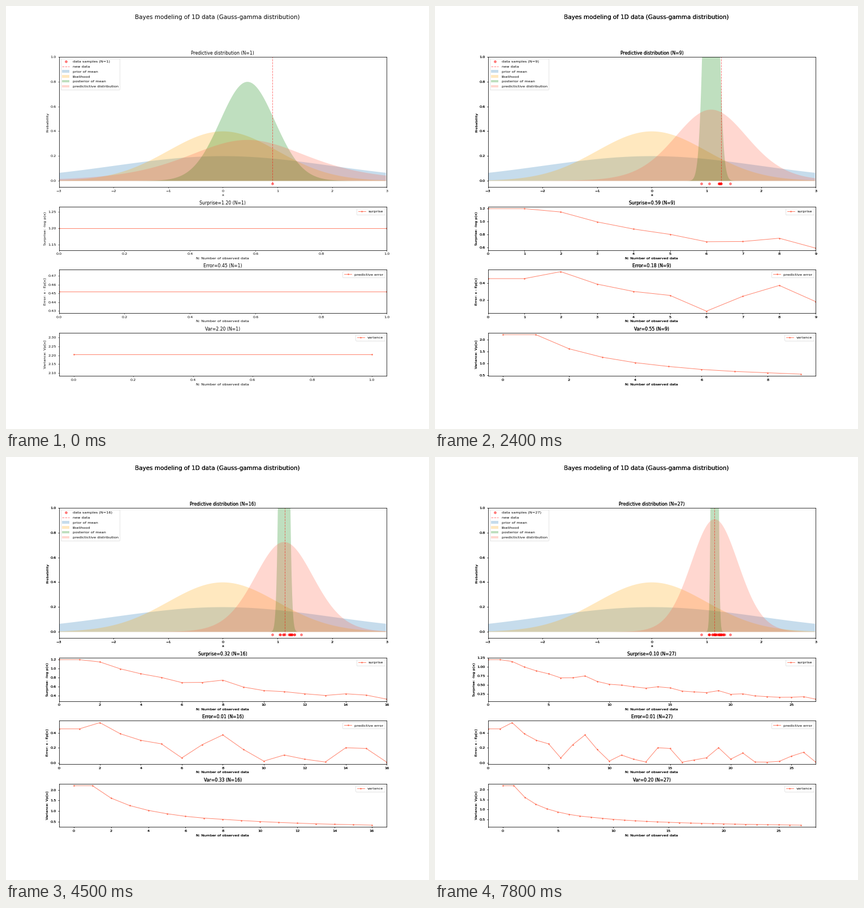
Write a matplotlib script that moves like this. It is 748 by 748 pixels and loops after 8000 ms.

```python
import math

import numpy as np
import matplotlib.pyplot as plt
from matplotlib.animation import FuncAnimation

plt.rcParams["font.family"] = "DejaVu Sans"

SAMPLES = np.array([
    0.9045, 1.2545, 1.2355, 1.2235, 1.2275, 1.052, 1.263, 1.438, 1.266,
    1.113, 1.203, 1.045, 1.107, 1.311, 1.314, 1.133, 1.165, 1.0536,
    1.334, 1.1847, 1.272, 1.1535, 1.1525, 1.164, 1.236, 1.293, 1.1405,
])
A0, B0, BETA0 = 2.0, 2.0, 1.0   # Gauss-gamma prior, centred on zero
GRID = np.arange(-3, 3, 0.01)
TICK_MS, STEP_MS, LOOP_MS = 100, 300, 8000


def normal_pdf(x, mean, sd):
    return np.exp(-0.5 * ((x - mean) / sd) ** 2) / (sd * math.sqrt(2 * math.pi))


def student_pdf(x, mean, scale2, dof):
    log_norm = (math.lgamma((dof + 1) / 2) - math.lgamma(dof / 2)
                - 0.5 * math.log(math.pi * dof * scale2))
    return np.exp(log_norm - (dof + 1) / 2
                  * np.log1p((x - mean) ** 2 / (dof * scale2)))


def posterior(n):
    """Mean, precision weight, squared scale and dof after n samples."""
    data = SAMPLES[:n]
    beta = BETA0 + n
    mean = data.sum() / beta
    a = A0 + n / 2
    b = B0 + 0.5 * ((data ** 2).sum() - beta * mean ** 2)
    return mean, beta, b / a * (1 + 1 / beta), 2 * a


def measures(n):
    mean, _, scale2, dof = posterior(n)
    x = SAMPLES[n - 1]
    surprise = -math.log(student_pdf(x, mean, scale2, dof))
    return surprise, abs(x - mean), scale2 * dof / (dof - 2)


# The first value is shown twice, at N=0 and N=1.
HISTORY = np.array([measures(max(n, 1)) for n in range(len(SAMPLES) + 1)])

fig, (top, *panels) = plt.subplots(
    4, 1, figsize=(16, 16), dpi=46.75,
    gridspec_kw=dict(height_ratios=[3, 1, 1, 1], hspace=0.3, left=0.125,
                     right=0.9, bottom=0.125, top=0.88))
heading = fig.suptitle("Bayes modeling of 1D data (Gauss-gamma distribution)",
                       fontsize=16)
ink = {"passes": 1}


def overprint(artist):
    """Draw an artist several times so its soft edges turn darker."""
    plain_draw = artist.draw

    def draw(renderer):
        for _ in range(ink["passes"]):
            plain_draw(renderer)

    artist.draw = draw


def outline(heights):
    xs = np.r_[GRID[0], GRID, GRID[-1]]
    return np.column_stack([xs, np.r_[0, heights, 0]])


def area(heights, color, label):
    xy = outline(heights)
    return top.fill(xy[:, 0], xy[:, 1], color=color, alpha=0.25, lw=0,
                    label=label)[0]


prior = area(normal_pdf(GRID, 0, 2), "tab:blue", "prior of mean")
likelihood = area(normal_pdf(GRID, 0, 1), "orange", "likelihood")
mean_area = area(0 * GRID, "green", "posterior of mean")
predictive = area(0 * GRID, "tomato", "predictictive distribution")
dots = top.scatter([0], [-0.02], color="red", alpha=0.5, label="data samples",
                   zorder=3)
new_line, = top.plot([0, 0], [-0.02, 1], "--", color="red", alpha=0.5,
                     label="new data")
top.set(xlim=(-3, 3), ylim=(-0.05, 1), xlabel="x", ylabel="Probability")
top_legend = top.legend(
    handles=[dots, new_line, prior, likelihood, mean_area, predictive],
    loc="upper left")

PANEL_TEXT = [("Surprise", "surprise", "Surprise: -log p(x)"),
              ("Error", "predictive error", "Error: x - Ep[x]"),
              ("Var", "variance", "Variance: Vp[x]")]
curves = []
for ax, (_, label, ylabel) in zip(panels, PANEL_TEXT):
    curve, = ax.plot([0, 1], [0, 1], color="tomato", marker=".", alpha=0.8,
                     label=label)
    curves.append(curve)
    ax.set(xlabel="N: Number of observed data", ylabel=ylabel)
    ax.legend(loc="upper right")

overprint(heading)
for ax in (top, *panels):
    for part in (ax.xaxis, ax.yaxis, ax.title):
        overprint(part)
    for spine in ax.spines.values():
        spine.set_linewidth(1.2)


def update(frame):
    n = min(frame * TICK_MS // STEP_MS + 1, len(SAMPLES))
    ink["passes"] = 1 if n == 1 else 2

    mean, beta, scale2, dof = posterior(n)
    mean_area.set_xy(outline(normal_pdf(GRID, mean, 1 / beta)))
    predictive.set_xy(outline(student_pdf(GRID, mean, scale2, dof)))
    dots.set_offsets(np.column_stack([SAMPLES[:n], np.full(n, -0.02)]))
    new_line.set_xdata([SAMPLES[n - 1]] * 2)
    top.set_title(f"Predictive distribution (N={n})")
    top_legend.get_texts()[0].set_text(f"data samples (N={n})")

    for k, (ax, curve) in enumerate(zip(panels, curves)):
        curve.set_data(np.arange(n + 1), HISTORY[:n + 1, k])
        ax.set_title(f"{PANEL_TEXT[k][0]}={HISTORY[n, k]:.2f} (N={n})")
        ax.relim()
        ax.autoscale_view()
        if ax is not panels[-1]:
            ax.set_xlim(0, n)
    return []


animation = FuncAnimation(fig, update, frames=LOOP_MS // TICK_MS,
                          interval=TICK_MS, repeat=True, repeat_delay=0)
plt.show()
```
